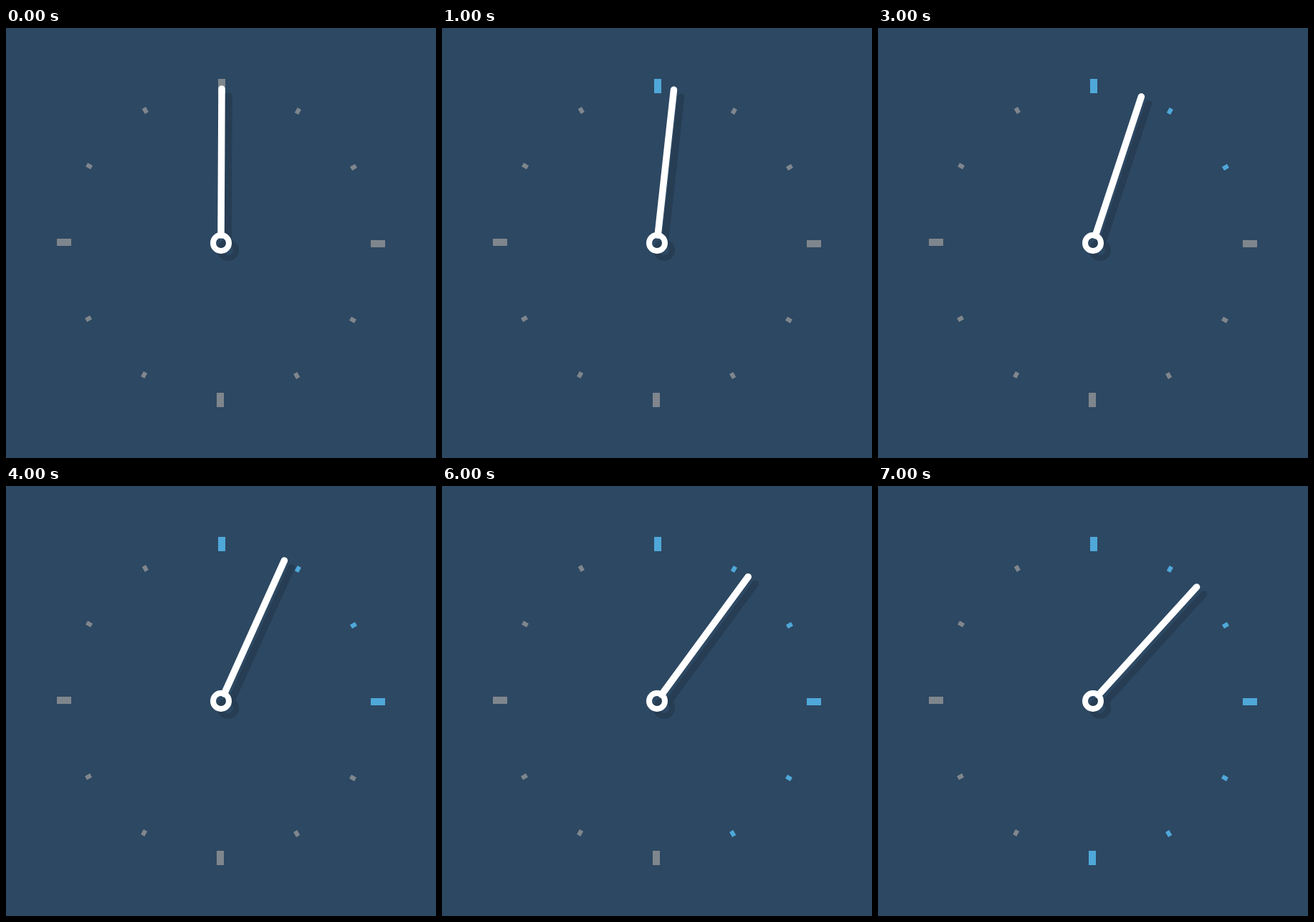
An HTML page that plays this animation: 600x600 px, repeating every 8000 ms.

```html
<!DOCTYPE html>
<html lang="en">
<head>
<meta charset="utf-8">
<title>Clock</title>
<style>
  html, body { margin: 0; height: 100%; overflow: hidden; background: #2d4862; }
  svg { display: block; width: 100%; height: 100%; }
  #ticks rect { fill: #7f868d; }
  #ticks rect.lit { fill: #4fa8d9; }
  #pointer { fill: none; stroke: #fff; filter: drop-shadow(10px 10px 0 rgba(0, 0, 0, .15)); }
</style>
</head>
<body>
<svg viewBox="-300 -300 600 600">
  <g id="ticks"></g>
  <g id="pointer">
    <path id="hand" d="M0 -11L1 -215" stroke-width="9.5" stroke-linecap="round"/>
    <circle r="11" stroke-width="8"/>
  </g>
</svg>
<script>
const LOOP_SECONDS = 8;
const ticks = document.getElementById('ticks');
const hand = document.getElementById('hand');

function addTick(hour) {
  const [width, length] = hour % 3 ? [6, 8] : [10, 20];
  const tick = document.createElementNS('http://www.w3.org/2000/svg', 'rect');
  const attributes = {
    x: 1 - width / 2, y: -209 - length, width, height: length,
    transform: `rotate(${hour * 30})`
  };
  for (const name in attributes) tick.setAttribute(name, attributes[name]);
  ticks.append(tick);
}

for (let hour = 0; hour < 12; hour++) addTick(hour);

const start = performance.now();

function draw() {
  const second = Math.floor((performance.now() - start) / 1000) % LOOP_SECONDS;
  hand.setAttribute('transform', `rotate(${second * 6})`);
  [...ticks.children].forEach((tick, hour) => tick.classList.toggle('lit', hour < second));
  requestAnimationFrame(draw);
}
draw();
</script>
</body>
</html>
```
